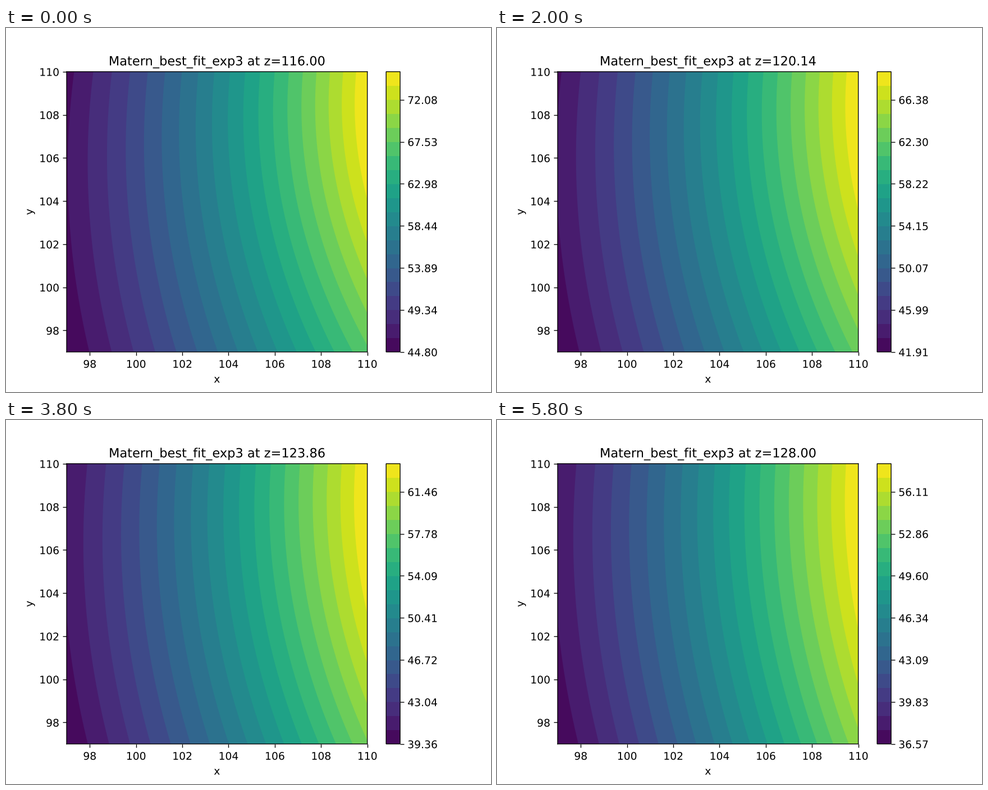
Recreate the animation shown at these times as a matplotlib script. Size 864 px wide and 648 px high, loop 6000 ms.

```python
import numpy as np
import matplotlib.pyplot as plt
from matplotlib import patheffects
from matplotlib.animation import FuncAnimation
from matplotlib.cm import ScalarMappable
from matplotlib.colors import BoundaryNorm, ListedColormap
from matplotlib.patches import Polygon

FRAMES, INTERVAL = 30, 200
DPI, W, H = 135, 864, 648
BANDS = 20
LO, HI = 97, 110

# Unsnapped lines and outlined glyphs keep sub-pixel positions
plt.rcParams.update({
    "path.snap": False,
    "path.effects": [patheffects.Normal()],
    "axes.linewidth": 0.72,
    "xtick.major.width": 0.72,
    "ytick.major.width": 0.72,
})

colors = plt.get_cmap("viridis")((np.arange(BANDS) + 0.5) / BANDS)
rows = np.linspace(LO - 0.1, HI + 0.1, 120)


def level_curve(s, t):
    """x along the curve of relative level s (0..1): a parabola in y."""
    ease = t * (1 - t)
    vertex_x = 96.166 + 17.965 * s - 5.316 * s**2 + 1.188 * s**3
    vertex_x -= (1 - s) * (0.206 + 0.558 * s) * (t + 0.65 * ease)
    vertex_y = 105.08 + 7.295 * s - 3.908 * s**2
    vertex_y += (1.51 * (1 - s)**3 - 0.26) * t
    bend = 0.01269 + 0.00715 * s + 0.0093 * s**2
    bend *= 1 - (0.07 + 0.35 * s) * (t - (1 - s) * ease)
    return vertex_x + bend * (rows - vertex_y)**2


def band_outline(s, t):
    """Everything to the right of the level curve."""
    right = HI + 20
    curve = np.column_stack([level_curve(s, t), rows])
    return np.vstack([curve, [right, rows[-1]], [right, rows[0]]])


def scale(t):
    """Lowest value and spacing of the colorbar labels."""
    base = 44.797 - 8.461 * t + 0.237 * t**2
    step = 4.5467 - t * (1.4445 - 0.35 * t + 0.3064 * t**2 - 0.1108 * t**3)
    return base, step


fig, ax = plt.subplots(figsize=(W / DPI, H / DPI), dpi=DPI)
ax.set(xlim=(LO, HI), ylim=(LO, HI), xlabel="x", ylabel="y",
       facecolor=colors[0])

bands = []
for k in range(1, BANDS):
    band = Polygon(band_outline(k / BANDS, 0), facecolor=colors[k], lw=0)
    ax.add_patch(band)
    bands.append((k / BANDS, band))

ticks = np.arange(0, BANDS, 3)
mapper = ScalarMappable(BoundaryNorm(np.arange(BANDS + 1), BANDS),
                        ListedColormap(colors))
cbar = fig.colorbar(mapper, ax=ax, ticks=ticks)
cbar.minorticks_off()


def update(i):
    t = i / (FRAMES - 1)
    for s, band in bands:
        band.set_xy(band_outline(s, t))
    base, step = scale(t)
    cbar.set_ticks(ticks, labels=[f"{base + n * step:.2f}"
                                  for n in range(len(ticks))])
    ax.set_title(f"Matern_best_fit_exp3 at z={116 + 12 * t:.2f}")
    return []


anim = FuncAnimation(fig, update, frames=FRAMES, interval=INTERVAL,
                     init_func=lambda: [], repeat=True, repeat_delay=0)
plt.show()
```
